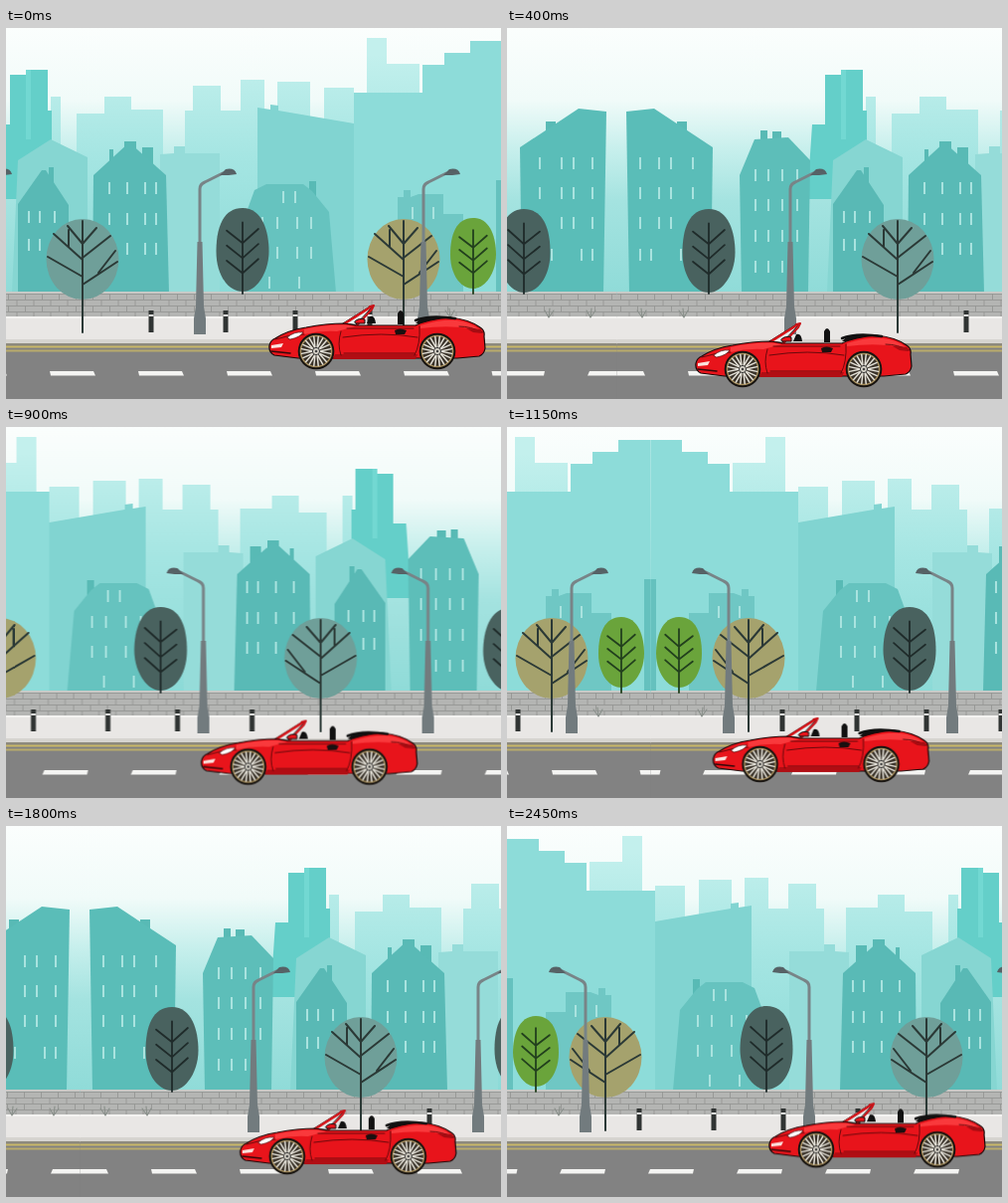
Recreate the animation shown at these times as an HTML page. Size 498 by 373 pixels, loop 2500 ms.

```html
<!DOCTYPE html>
<html lang="en">
<head>
<meta charset="utf-8">
<title>City drive</title>
<style>
html, body { margin: 0; width: 100%; height: 100%; overflow: hidden; background: #fff; }
svg { display: block; width: 498px; height: 373px; }
#street { animation: scroll 2.5s infinite; }
#car { animation: drive 2.5s infinite; }

/* 20 pictures per second: every segment is cut into 50 ms steps */
@keyframes scroll {
  0%   { transform: translateX(-206px); animation-timing-function: steps(1); }
  2%   { transform: translateX(-198px); animation-timing-function: steps(1); }
  4%   { transform: translateX(-174px); animation-timing-function: steps(1); }
  6%   { transform: translateX(-134px); animation-timing-function: steps(5); }
  16%  { transform: translateX(110px); animation-timing-function: steps(6); }
  28%  { transform: translateX(400px); animation-timing-function: steps(9); }
  46%  { transform: translateX(849px); animation-timing-function: steps(8); }
  62%  { transform: translateX(1244px); animation-timing-function: steps(11); }
  84%  { transform: translateX(1772px); animation-timing-function: steps(7); }
  98%, 100% { transform: translateX(2115px); animation-timing-function: steps(1); }
}
@keyframes drive {
  0%   { transform: translate(0, 0); animation-timing-function: steps(1); }
  2%   { transform: translate(-3px, .7px); animation-timing-function: steps(1); }
  4%   { transform: translate(-11px, 2.6px); animation-timing-function: steps(6); }
  16%  { transform: translate(-75px, 18px); animation-timing-function: steps(1); }
  18%  { transform: translate(-83px, 20px); animation-timing-function: steps(1); }
  20%  { transform: translate(-86px, 20.7px); animation-timing-function: steps(4); }
  28%  { transform: translate(-77px, 18.6px); animation-timing-function: steps(35); }
  98%, 100% { transform: translate(-1px, .3px); animation-timing-function: steps(1); }
}
</style>
</head>
<body>
<svg viewBox="0 0 498 373" xmlns="http://www.w3.org/2000/svg">
  <defs>
    <linearGradient id="sky" x2="0" y2="1">
      <stop offset="0" stop-color="#fbfefd"/>
      <stop offset=".27" stop-color="#f1fbf9"/>
      <stop offset=".46" stop-color="#c6efec"/>
      <stop offset=".65" stop-color="#a4e3e0"/>
      <stop offset="1" stop-color="#8fdbd8"/>
    </linearGradient>
    <linearGradient id="far" x2="0" y2="266" gradientUnits="userSpaceOnUse">
      <stop offset=".1" stop-color="#c3f0ed"/>
      <stop offset=".5" stop-color="#a4e5e2"/>
      <stop offset="1" stop-color="#8cdad7"/>
    </linearGradient>
    <pattern id="bricks" width="17" height="12" y="267" patternUnits="userSpaceOnUse">
      <rect width="17" height="12" fill="#b4b5b3"/>
      <path d="M0 .5H17M0 6.5H17M4.5 0V6M13 6V12" stroke="#959694" stroke-width=".9"/>
    </pattern>
    <clipPath id="edge"><rect x="-.5" width="706" height="373"/></clipPath>
    <g id="half" clip-path="url(#edge)"></g>
    <g id="block">
      <use href="#half"/>
      <use href="#half" transform="scale(-1 1)"/>
    </g>
    <g id="wheel">
      <circle r="18.3" fill="#17130f"/>
      <circle r="15.6" fill="#3a332a" stroke="#a58d5c" stroke-width="1.5"/>
      <g id="spokes" stroke="#e4e1d8" stroke-width="1.5"></g>
      <circle r="3.6" fill="#d9d5ca" stroke="#333"/>
      <circle r="1.3" fill="#444"/>
    </g>
  </defs>

  <g id="street">
    <use href="#block"/>
    <use href="#block" x="-1410"/>
  </g>

  <g id="car" stroke-linejoin="round" stroke-linecap="round">
    <path d="M363 297L366 290Q371 288 372 297ZM394 298V287Q397 281 400 287V298ZM412 297Q418 290 430 290L449 291L455 297Z" fill="#111"/>
    <path d="M339 297L366 280L369 280L352 298Z" fill="#e9f0ef" stroke="#111"/>
    <path d="M341 297L367 280.500" stroke="#d8161b" stroke-width="2.600"/>
    <path d="M366 280L370 279L368 283L353 299" fill="none" stroke="#c81217" stroke-width="2"/>
    <path d="M265 319Q266 314 271 312Q283 304 302 301Q322 297 341 297L352 299H412Q424 293 447 291Q466 293 477 301Q482 304 481 310L482 322Q481 328 476 330L454 332H294L270 329Q264 326 265 319Z" fill="#e8141b" stroke="#1a0808" stroke-width="1.200"/>
    <path d="M300 303Q321 298 341 298.500L351 300L333 305Q316 304 300 308ZM417 299Q436 293 453 294Q468 296 476 303Q446 298 417 302Z" fill="#f9393c"/>
    <path d="M331 328H414L412 333H329Z" fill="#b10d13"/>
    <path d="M337 305Q333 318 337 329M343 302H410M416 300Q417 318 411 329M340 327H411M339 311Q378 305 414 311M271 313Q286 308 300 308M456 300Q467 300 480 306" fill="none" stroke="#5c080b" stroke-width=".9"/>
    <path d="M283 311Q290 305 299 306Q296 311 286 313Z" fill="#fff" stroke="#4b1111" stroke-width=".7"/>
    <path d="M267 319L279 317L277 321L267 322Z" fill="#fbe3df"/>
    <path d="M267 325L286 327" stroke="#33090a" stroke-width="1.500"/>
    <path d="M463 302L478 303L479 307L470 306Z" fill="#a60c12"/>
    <path d="M391 304Q396 301 403 304L401 308H392Z" fill="#1a1010"/>
    <path d="M351 295Q355 291 361 293V297H352Z" fill="#e8141b" stroke="#111"/>
    <path d="M412 294Q426 288 452 292" fill="none" stroke="#111" stroke-width="2.500"/>
    <use href="#wheel" x="312" y="325"/>
    <use href="#wheel" x="434" y="325"/>
  </g>
</svg>

<script>
const rect = (x, y, w, h, fill) => `<rect x="${x}" y="${y}" width="${w}" height="${h}" fill="${fill}"/>`;
const poly = (points, fill) => `<polygon points="${points}" fill="${fill}"/>`;
const line = (d, stroke, width) =>
  `<path d="${d}" fill="none" stroke="${stroke}" stroke-width="${width}" stroke-linecap="round"/>`;
const each = (list, draw) => list.map(draw).join('');

const tower = ([x, y, w]) => rect(x, y, w, 266 - y, 'url(#far)');
const chimney = (x, y, w) => rect(x, y, w, 30, '#58bab5');
const panes = (cols, rows) =>
  each(rows, y => each(cols, x => rect(x, y, 2, 12, '#a9e3df')));

function bigTree(x, fill) {
  const twigs = 'M0 306V194M0 217L-15 199M0 217L14 201M0 233L-29 207M0 231L28 209' +
    'M0 250L-35 230M0 258L35 235M-14 220V203M16 246L33 224';
  return `<g transform="translate(${x})"><ellipse cy="232.500" rx="36.500" ry="40.500" fill="${fill}"/>` +
    line(twigs, '#2b3936', 2) + '</g>';
}

function smallTree(x, rx, top, bottom, fill, bark) {
  const h = bottom - top, mid = top + h * .52;
  let twigs = `M0 267V${top + h * .17}`;
  for (const k of [.42, .6, .78]) {
    const y = top + h * k, r = rx * .6;
    twigs += `M${-r} ${y - h * .15}L0 ${y}L${r} ${y - h * .17}`;
  }
  return `<g transform="translate(${x})"><path d="M0 ${top}C${rx * .75} ${top} ${rx} ${top + h * .28} ${rx} ${mid}` +
    `S${rx * .55} ${bottom} 0 ${bottom}S${-rx} ${bottom - h * .2} ${-rx} ${mid}S${-rx * .75} ${top} 0 ${top}Z" fill="${fill}"/>` +
    line(twigs, bark, 1.8) + '</g>';
}

const lamp = x => `<g transform="translate(${x})">` +
  line('M0 290V162Q0 157 5 155L23 146', '#788487', 3) +
  poly('-2.5,215 2.500,215 4,280 6,292 6,308 -6,308 -6,292 -4,280', '#727b7e') +
  '<path d="M20 148L26 142Q35 140 37 147L29 148Z" fill="#566266"/></g>';

const bollard = x => rect(x - 2.5, 284, 5, 22, '#303433') + rect(x - 2.5, 288, 5, 2, '#e6e6e3');
const tuft = x => line(`M${x} 291L${x - 5} 284M${x} 291L${x - 1} 282M${x} 291L${x + 4} 284`, '#8b918c', 1.2);
const dash = x => poly(`${x},345 ${x + 44},345 ${x + 46},349.500 ${x + 1},349.500`, '#f4f4f2');

const skyline = rect(-1, 0, 708, 268, 'url(#sky)') +
  each([[251, 69, 10], [277, 86, 28], [305, 69, 27], [332, 82, 32], [386, 83, 72], [394, 58, 28],
    [442, 52, 24], [479, 54, 33], [526, 60, 30], [569, 10, 20], [589, 36, 33]], tower) +
  poly('361,127 375,126 375,119 386,119 386,126 421,126 421,266 361,266', '#95dcd9') +
  poly('556,65 625,65 625,37 647,37 647,25 673,25 673,13 706,13 706,266 556,266', '#8ddcd9') +
  poly('459,80 472,82 472,77 480,78 480,83 556,96 556,266 459,266', '#81d4d1') +
  poly('197,97 210,97 210,47 226,47 226,42 248,42 248,83 252,83 252,172 192,172', '#64cfc9') +
  rect(226, 42, 5, 70, '#72d8d2') +
  poly('218,133 251,112 288,130 288,266 212,266', '#86d6d2');

const houses =
  chimney(61, 94, 10) +
  poly('10,84 38,81 97,120 95,266 13,266', '#5abdb8') +
  panes([23, 42, 54, 76], [130, 160, 190]) + panes([23, 34, 64], [222]) +
  chimney(145, 103, 7) + chimney(157, 104, 9) +
  poly('124,148 139,112 173,110 195,133 193,266 126,266', '#5dbeb9') +
  panes([139, 152, 166, 181], [142, 172, 203]) + panes([139, 152, 166], [234]) +
  chimney(249, 140, 5) +
  poly('218,177 242,143 246,143 269,178 269,266 218,266', '#59b9b5') +
  panes([228, 239, 254], [184, 212]) +
  chimney(310, 122, 4) + chimney(325, 114, 12) + chimney(343, 120, 11) +
  poly('294,148 330,115 367,148 370,266 293,266', '#59bab6') +
  panes([309, 327, 345, 356], [155, 186, 216]) +
  chimney(511, 154, 7) +
  poly('446,266 448,185 456,163 468,157 505,157 514,164 531,185 538,266', '#66c3bf') +
  panes([463, 478, 498, 512], [190, 220]) + panes([470, 500], [250]) + panes([484, 496], [164]) +
  poly('600,170 606,170 606,163 613,163 613,170 621,167 646,167 646,187 666,187 666,266 600,266', '#6fc7c4') +
  panes([614, 635], [180, 210, 238]) +
  rect(699, 153, 12, 113, '#65c1be');

const ground =
  rect(-1, 266, 708, 25, 'url(#bricks)') + rect(-1, 265, 708, 2, '#c8cac7') +
  rect(-1, 290, 708, 24, '#e9e7e5') + rect(-1, 290, 708, 2, '#f4f3f1') +
  rect(-1, 313, 708, 5, '#d6d4d0') + rect(-1, 317, 708, 2, '#8d8a7e') +
  rect(-1, 319, 708, 54, '#828282') +
  rect(-1, 319.5, 708, 2, '#c9b868') + rect(-1, 323.5, 708, 2, '#b9ab6c') +
  each([...Array(8).keys()], k => dash(606 - 89 * k)) + dash(694.5) +
  each([26, 68, 653], tuft);

document.getElementById('half').innerHTML = skyline + houses + ground +
  smallTree(93, 26.5, 182, 266, '#49625f', '#1f2b2a') +
  smallTree(444, 26.5, 181, 265, '#49625f', '#1f2b2a') +
  smallTree(676, 23, 191, 262, '#6aa43b', '#22401d') +
  bigTree(283, '#6f9f99') + bigTree(606, '#a5a26d') +
  each([352, 427, 497, 572], bollard) + each([175, 401, 626], lamp);

document.getElementById('spokes').innerHTML = each([...Array(10).keys()], k =>
  `<path d="M-1 -3L-2.200 -14.500M1 -3L2.200 -14.500" transform="rotate(${k * 36})"/>`);
</script>
</body>
</html>
```
